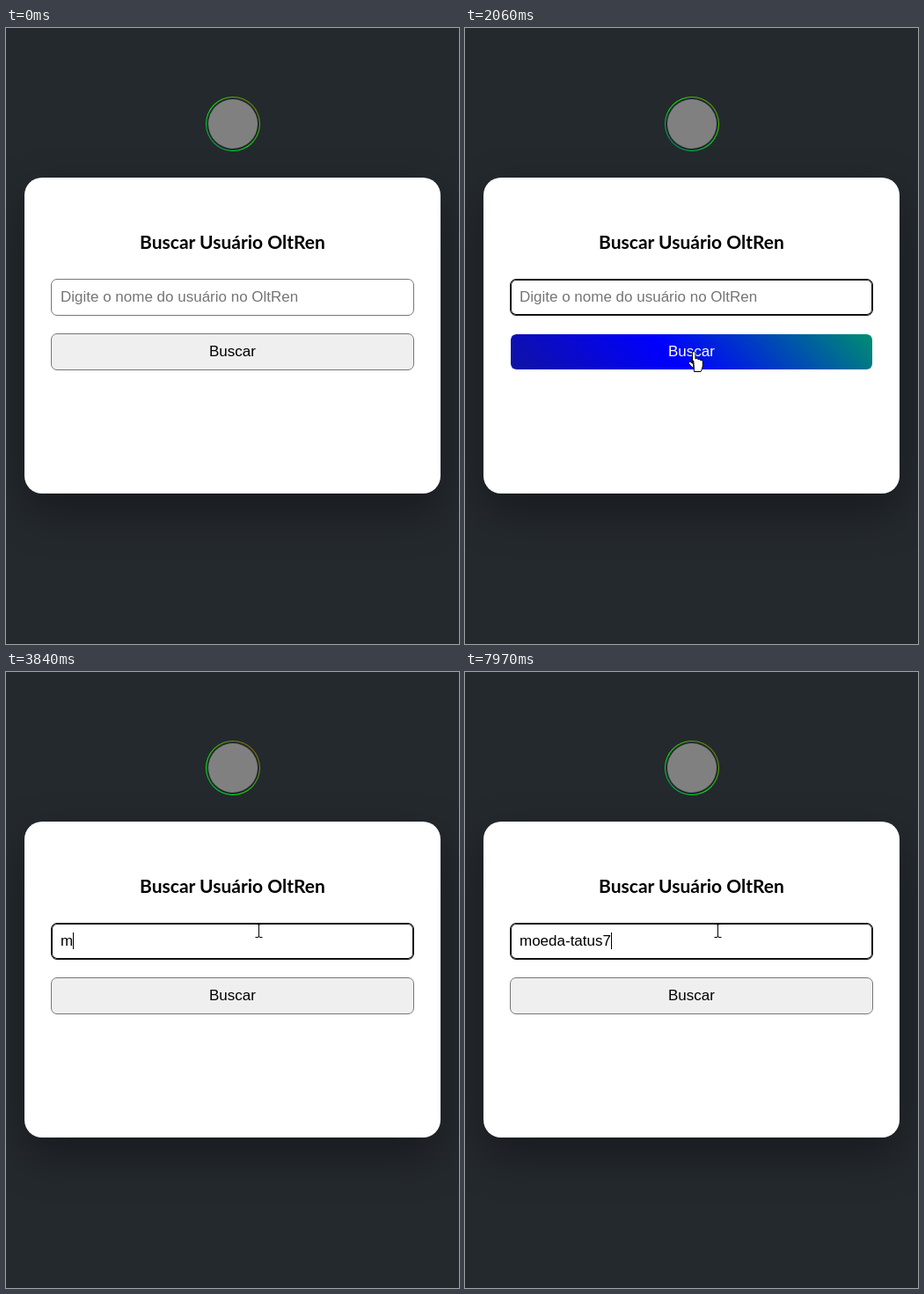
These frames come from a looping animation (515x700 px, 8 s). An HTML page:

```html
<!DOCTYPE html>
<html lang="pt-BR">
<head>
<meta charset="utf-8">
<title>Buscar Usuário</title>
<style>
  html, body { margin: 0; width: 100%; height: 100%; overflow: hidden; background: #24292e; }
  #stage { position: relative; width: 515px; height: 700px; overflow: hidden; font: 17px "Liberation Sans", Arial, sans-serif; }
  #stage > * { position: absolute; box-sizing: border-box; }
  .flow {
    background-image: linear-gradient(45deg, #24292e, #00f, #0f0, #f00, #24292e);
    background-size: 400% 400%;
  }
  #ring { left: 227px; top: 78px; width: 62px; height: 62px; border-radius: 50%; }
  #ring::before, #ring::after { content: ""; position: absolute; border-radius: 50%; }
  #ring::before { inset: 1.2px; background: #24292e; }
  #ring::after { inset: 2.6px; background: #808080; }
  #card { left: 21px; top: 170px; width: 473px; height: 359px; border-radius: 20px; background: #fff; box-shadow: 0 20px 50px rgba(0, 0, 0, .35); }
  h1 { left: 21px; top: 230px; width: 473px; margin: 0; text-align: center; font: 700 21px/26px Lato, sans-serif; white-space: nowrap; }
  .box { left: 51px; width: 413px; height: 42px; border: 1px solid #767676; border-radius: 7px; line-height: 40px; white-space: pre; }
  #field { top: 285px; padding-left: 10px; background: #fff; }
  #field.focus { border-color: #101010; box-shadow: inset 0 0 0 1px #101010; }
  #hint { position: absolute; left: 10px; top: 0; color: #757575; }
  #caret { display: inline-block; width: 1px; height: 19px; margin-right: -1px; vertical-align: -4px; background: #000; }
  #button { top: 347px; text-align: center; background-color: #efefef; background-clip: padding-box; }
  #cursor { left: 0; top: 0; width: 30px; height: 30px; overflow: visible; }
</style>
</head>
<body>
<div id="stage">
  <div id="ring" class="flow"></div>
  <div id="card"></div>
  <h1>Buscar Usuário OltRen</h1>
  <div id="field" class="box"><span id="typed"></span><i id="caret"></i><span id="hint">Digite o nome do usuário no OltRen</span></div>
  <div id="button" class="box">Buscar</div>
  <svg id="cursor" fill="#fff" stroke="#000">
    <path id="arrow" d="M0 0V17L4 13.3 6.7 19.5 9.2 18.4 6.6 12.4H12Z"/>
    <path id="hand" stroke-linejoin="round" d="M-1.5 1.5Q-1.5-.5 .2-.5T2 1.5V8Q3.5 6.5 5 8.5 6.6 7.5 7.6 9.5 10 8.8 10.3 11V16Q10 19 8 22.5H.5Q-1-1 0 19Q-1.5 18-5.3 13.8-6.3 12-4.6 11.4-3.4 11-1.5 13.2Z"/>
    <path id="beam" fill="none" d="M-3.5-7.5H-1Q.5-7.5 .5-6Q.5-7.5 2-7.5H4.5M.5-7V7M-3.5 7.5H-1Q.5 7.5 .5 6Q.5 7.5 2 7.5H4.5"/>
  </svg>
</div>
<script>
const LOOP = 8000, CYCLE = 4000, FADE = 300, FOCUS = 1400;
const USER = "moeda-tatus7";
const KEYS = [3700, 3950, 4300, 4500, 4720, 4850, 4970, 5400, 5950, 6120, 7100, 7800];
const HOVERS = [[460, 508], [1750, 2505]];
// time, x, y
const PATH = [
  [70, 450, 705], [300, 405, 595], [430, 330, 420], [480, 300, 368], [560, 270, 308],
  [1690, 270, 308], [1775, 260, 368], [2470, 260, 368], [2560, 269, 308],
  [3200, 269, 308], [3500, 287, 294]
];

const el = {};
for (const node of document.querySelectorAll("[id]")) el[node.id] = node;

const clamp = v => Math.max(0, Math.min(1, v));
const mix = (a, b, k) => a + (b - a) * k;
const show = (node, on) => { node.style.display = on ? "" : "none"; };

// Percentage that runs 0 → 100 → 0 in one cycle
function pingPong(ms) {
  const k = ((ms % CYCLE) + CYCLE) % CYCLE / CYCLE;
  return 100 * (1 - Math.abs(1 - 2 * k));
}

function cursorAt(t) {
  const i = PATH.findIndex(p => p[0] > t);
  if (i === 0) return PATH[0].slice(1);
  if (i < 0) return PATH[PATH.length - 1].slice(1);
  const [t0, x0, y0] = PATH[i - 1], [t1, x1, y1] = PATH[i];
  const k = (t - t0) / (t1 - t0);
  return [mix(x0, x1, k), mix(y0, y1, k)];
}

function drawCursor(t) {
  const [x, y] = cursorAt(t).map(Math.round);
  const overField = y >= 285 && y < 327, overButton = y >= 347 && y < 389;
  el.cursor.style.transform = `translate(${x}px, ${y}px)`;
  show(el.beam, overField);
  show(el.hand, overButton);
  show(el.arrow, !overField && !overButton);
}

function drawButton(t) {
  const hover = HOVERS.find(([a, b]) => t >= a && t < b);
  let lit = 0;
  for (const [a, b] of HOVERS) {
    if (t >= a) lit = clamp((Math.min(t, b) - a) / FADE) * (1 - clamp((t - b) / FADE));
  }
  el.button.classList.toggle("flow", !!hover);
  el.button.style.backgroundPosition = hover ? `${pingPong(t - hover[0])}% 50%` : "";
  const ink = Math.round(255 * lit), edge = Math.round(mix(118, 255, lit));
  el.button.style.color = `rgb(${ink},${ink},${ink})`;
  el.button.style.borderColor = `rgb(${edge},${edge},${edge})`;
}

function drawField(t) {
  const count = KEYS.filter(k => k <= t).length;
  const lastInput = count ? KEYS[count - 1] : FOCUS;
  el.typed.textContent = USER.slice(0, count);
  show(el.hint, count === 0);
  el.field.classList.toggle("focus", t >= FOCUS);
  el.caret.style.visibility = t >= FOCUS && (t - lastInput) % 1000 < 500 ? "visible" : "hidden";
}

function draw(now) {
  const t = now % LOOP;
  el.ring.style.backgroundPosition = `${pingPong(t - 1100)}% 50%`;
  drawField(t);
  drawButton(t);
  drawCursor(t);
}

const start = performance.now();
function tick() {
  draw(performance.now() - start);
  requestAnimationFrame(tick);
}
tick();
</script>
</body>
</html>
```
